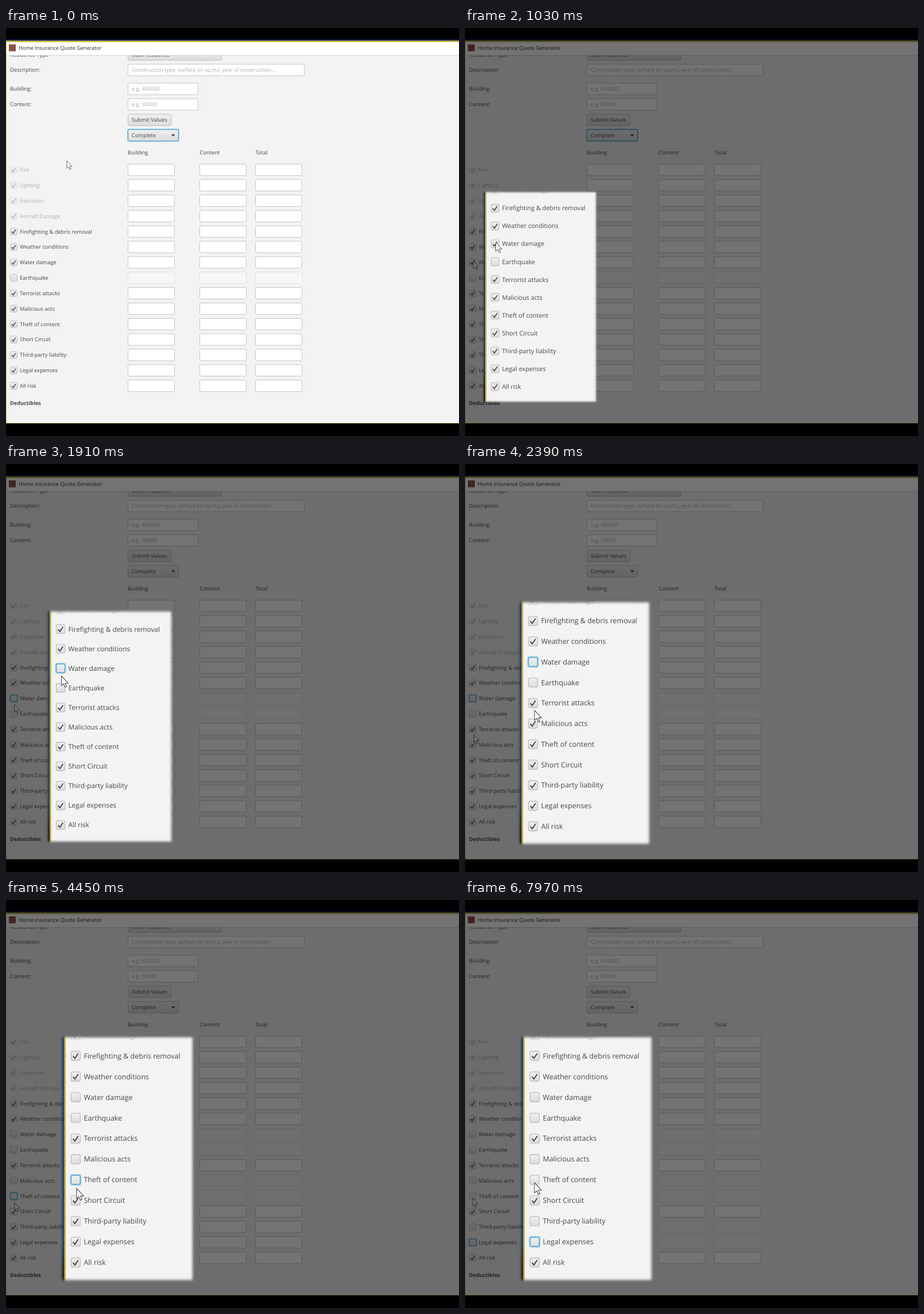
An HTML page that plays this animation: 789x710 px, repeating every 8 s.

```html
<!DOCTYPE html>
<html lang="en">
<head>
<meta charset="utf-8">
<title>Quote form</title>
<style>
  html, body { margin: 0; width: 100%; height: 100%; overflow: hidden; background: #000; }
  svg { display: block; width: 789px; height: 710px; }
  text { font: 9.36px "Open Sans", "Noto Sans", sans-serif; fill: #484848; text-rendering: geometricPrecision; }
  .title { font-size: 9.12px; fill: #2c2c2c; }
  .hint { font-size: 9.12px; fill: #acacac; }
  .bold { font-size: 9.15px; font-weight: 700; }
  .field { fill: #fff; stroke: #c4c4c4; }
  .button, .box { fill: url(#shade); stroke: #bebebe; }
  .tick { fill: none; stroke: #444; stroke-width: 1.4; }
  .locked, .off .field { opacity: .4; }
  .off .tick { display: none; }
  .focus .box, .focus .button { stroke: #4aa6d2; stroke-width: 1.2; }
  .halo { display: none; fill: none; stroke: #a9d6ea; stroke-width: 1; }
  .focus .halo { display: inline; }
  .cursor { fill: #fff; stroke: #484848; stroke-width: .8; stroke-linejoin: round; }
</style>
</head>
<body>
<svg viewBox="0 0 789 710">
  <defs>
    <linearGradient id="shade" x2="0" y2="1">
      <stop stop-color="#f0f0f0"/><stop offset="1" stop-color="#dcdcdc"/>
    </linearGradient>
    <linearGradient id="desktop" x2="0" y2="1">
      <stop offset=".86" stop-color="#0a3164"/><stop offset=".92" stop-color="#05080f"/>
    </linearGradient>
    <filter id="soften" filterUnits="userSpaceOnUse" x="-20" y="310" width="210" height="360">
      <feGaussianBlur stdDeviation="1.5"/>
    </filter>
    <mask id="panel" maskUnits="userSpaceOnUse" x="-20" y="310" width="210" height="360">
      <rect x="-3.6" y="330" width="169" height="315.4" fill="#fff" filter="url(#soften)"/>
    </mask>
  </defs>
  <g id="form"></g>
  <rect id="dim" width="789" height="710"/>
  <g id="lens" mask="url(#panel)"><use href="#form"/></g>
</svg>
<script>
const DURATION = 8000, ROW_TOP = 246.8, ROW_STEP = 26.85;
const $ = id => document.getElementById(id);

const risks = ["Fire", "Lighting", "Explosion", "Aircraft Damage", "Firefighting &amp; debris removal",
  "Weather conditions", "Water damage", "Earthquake", "Terrorist attacks", "Malicious acts",
  "Theft of content", "Short Circuit", "Third-party liability", "Legal expenses", "All risk"];
const LOCKED_COUNT = 4, EARTHQUAKE = 7;

// Row index and the moment it gets unticked.
const clicks = [[6, 1700], [9, 3000], [10, 3900], [12, 5450], [13, 6800]];

// Pointer path: time, x, y.
const path = [[0, 106, 231], [640, 20.4, 384.7], [900, 14.5, 405], [1390, 14.5, 408], [1800, 14.5, 410],
  [2390, 15.5, 471], [2750, 14.5, 490], [3150, 14.5, 491], [3500, 14.5, 513], [4000, 14.5, 515],
  [4450, 14.7, 526.5], [4950, 14, 564], [5150, 13, 571], [5550, 12, 572], [6000, 11.4, 589],
  [6300, 12, 600], [6650, 12, 599], [7400, 12, 596], [7520, 12, 586], [7970, 13.2, 519], [8000, 13.2, 518]];

const label = (x, y, words, cls = "") => `<text class="${cls}" x="${x}" y="${y + 3.3}">${words}</text>`;
const block = (cls, x, y, w, h = 20) =>
  `<rect class="${cls}" x="${x + .5}" y="${y - h / 2}" width="${w - 1}" height="${h}" rx="2.2"/>`;
const input = (x, y, w, hint) => block("field", x, y, w) + label(219, y, hint, "hint");
const combo = (y, w, words) => block("halo", 211, y, w + 2, 22) + block("button", 212, y, w)
  + label(219, y, words) + `<path d="M${w + 199} ${y - 1.5}h6.4l-3.2 3.6z" fill="#333"/>`;

function riskRow(name, i) {
  const y = ROW_TOP + i * ROW_STEP;
  return `<g id="row${i}"><g class="${i < LOCKED_COUNT ? "locked" : ""}">
    ${block("halo", 6, y, 15, 14)}${block("box", 7, y, 13, 12)}
    <path class="tick" d="M10 ${y + .2}l2.5 3 4.3-6.4"/>${label(24, y, name)}</g>
    ${[212, 337, 434].map(x => block("field", x, y, 82)).join("")}</g>`;
}

$("form").innerHTML = `
  <rect x="-20" width="820" height="710"/>
  <rect x="-20" y="20" width="820" height="668" fill="url(#desktop)"/>
  <rect x="-1.5" y="22" width="800" height="666" fill="#d0b238"/>
  <rect x=".6" y="47" width="800" height="640.5" fill="#f3f3f3"/>
  ${label(7, 46.2, "Residence Type")}${combo(46.2, 164, "Main residence")}
  <rect x=".6" y="24.5" width="800" height="23" fill="#fff"/>
  <path d="M.8 47.5H789" stroke="#d4d4d4"/>
  <rect x="5" y="28.5" width="12" height="12" fill="#8c5145"/>
  ${label(22, 34.8, "Home Insurance Quote Generator", "title")}
  ${label(7, 73, "Description:")}
  ${input(212, 73, 308, "Construction type, surface (in sq.m.), year of construction...")}
  ${label(7, 106, "Building:")}${input(212, 106, 123, "e.g. 400000")}
  ${label(7, 133, "Content:")}${input(212, 133, 123, "e.g. 50000")}
  ${block("button", 212, 160, 76)}${label(219, 160, "Submit Values")}
  <g id="plan">${combo(186.7, 89, "Complete")}</g>
  ${label(212, 217, "Building")}${label(337.5, 217, "Content")}${label(434.5, 217, "Total")}
  ${risks.map(riskRow).join("")}
  ${label(7, 652.7, "Deductibles", "bold")}
  <path id="cursor" class="cursor" d="M0 0V13.2L3 10.5 5.2 15.4 7.1 14.6 5 9.8H9.2Z"/>`;

const mix = (a, b, p) => a + (b - a) * p;
const clamp = v => Math.min(1, Math.max(0, v));

function pointerAt(t) {
  const i = path.findIndex(p => p[0] > t);
  const [t0, x0, y0] = path[i - 1], [t1, x1, y1] = path[i];
  const p = (t - t0) / (t1 - t0), eased = p * p * (3 - 2 * p);
  const k = (p + eased) / 2;
  return [mix(x0, x1, k), mix(y0, y1, k)];
}

function setClass(el, cls) {
  if (el.getAttribute("class") !== cls) el.setAttribute("class", cls);
}

function render(t) {
  const done = clicks.filter(([, at]) => t >= at).map(([row]) => row);
  const focused = done.at(-1);
  setClass($("plan"), done.length ? "" : "focus");
  risks.forEach((_, i) => {
    const off = i === EARTHQUAKE || done.includes(i);
    setClass($("row" + i), (off ? "off" : "") + (i === focused ? " focus" : ""));
  });

  const [x, y] = pointerAt(t);
  $("cursor").setAttribute("transform", `translate(${x.toFixed(2)} ${y.toFixed(2)})`);

  const fade = clamp(t / 500), zoom = clamp(t / 2450);
  $("dim").setAttribute("opacity", .55 * fade);
  $("lens").setAttribute("opacity", fade);
  $("lens").setAttribute("transform",
    `translate(${mix(-11.5, 103.3, zoom)} ${mix(-18.2, -203, zoom)}) scale(${mix(1.0234, 1.339, zoom)})`);
}

let start;
function tick(now) {
  start ??= now;
  render((now - start) % DURATION);
  requestAnimationFrame(tick);
}
render(0);
requestAnimationFrame(tick);
</script>
</body>
</html>
```
